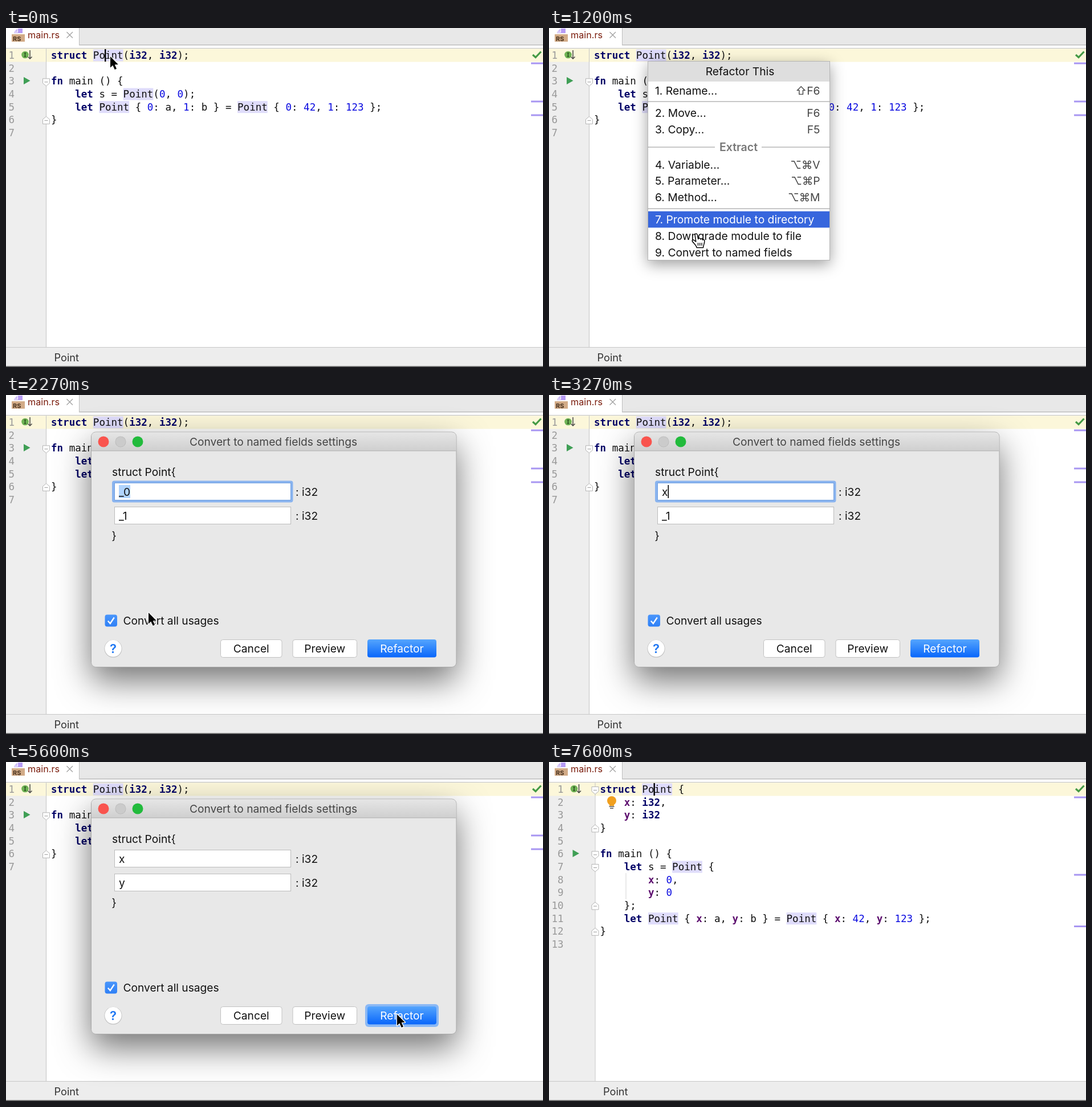
Write an HTML page with a canvas that moves like this. It is 942 by 595 pixels and loops after 7.67 s.

```html
<!DOCTYPE html>
<html lang="en">
<head>
<meta charset="utf-8">
<title>Convert to named fields</title>
<style>
html, body { margin: 0; width: 100%; height: 100%; overflow: hidden; background: #fff; }
canvas { display: block; width: 942px; height: 595px; }
</style>
</head>
<body>
<canvas id="stage"></canvas>
<script>
const W = 942, H = 595, LOOP = 7670;
const canvas = document.getElementById('stage');
const g = canvas.getContext('2d');
const dpr = window.devicePixelRatio || 1;
canvas.width = W * dpr;
canvas.height = H * dpr;

const MONO = '"DejaVu Sans Mono", monospace';
const UI = 'Inter, Roboto, sans-serif';
const CODE_SIZE = 17.52, CHAR = 10.55, ROW = 22.67, ROW_1 = 48;

// Event times in ms
const AT = {
  menuOpen: 330, menuClose: 1730, dialogOpen: 2130, typeX: 2900, tab: 3460,
  typeY: 3860, mouseBack: 4330, press: 5400, dialogClose: 5730, convert: 5860,
  mouseGone: 6800, bulb: 7330
};

const BEFORE = {
  shift: 0, run: 3, open: [1, 3], close: [6], stripes: [62, 129, 153],
  lines: [
    'struct Point(i32, i32);', '', 'fn main () {', '    let s = Point(0, 0);',
    '    let Point { 0: a, 1: b } = Point { 0: 42, 1: 123 };', '}', ''
  ]
};
BEFORE.open = [3];
const AFTER = {
  shift: 10.5, run: 6, open: [1, 6, 7], close: [4, 10, 12], stripes: [62, 198, 288.5],
  lines: [
    'struct Point {', '    x: i32,', '    y: i32', '}', '', 'fn main () {',
    '    let s = Point {', '        x: 0,', '        y: 0', '    };',
    '    let Point { x: a, y: b } = Point { x: 42, y: 123 };', '}', ''
  ]
};

const MENU = [
  [110, '1. Rename...', '⇧F6'], [149, '2. Move...', 'F6'], [177.5, '3. Copy...', 'F5'],
  [239.5, '4. Variable...', '⌥⌘V'], [268, '5. Parameter...', '⌥⌘P'], [297, '6. Method...', '⌥⌘M'],
  [336, '7. Promote module to directory', ''], [365, '8. Downgrade module to file', ''],
  [394, '9. Convert to named fields', '']
];

// Pointer path: time, x, y
const PATH = [
  [0, 183, 50], [600, 183, 50], [867, 212, 150], [1000, 238, 250], [1200, 258, 362],
  [1333, 254, 387], [1467, 250, 382], [4400, 250, 382], [4800, 480, 406], [5200, 686, 443]
];

function rect(x, y, w, h, color) {
  g.fillStyle = color;
  g.fillRect(x, y, w, h);
}

function box(x, y, w, h, r, fill, line) {
  g.beginPath();
  g.roundRect(x, y, w, h, r);
  g.fillStyle = fill;
  g.fill();
  if (line) {
    g.strokeStyle = line;
    g.lineWidth = 1;
    g.stroke();
  }
}

function disc(x, y, r, color) {
  g.beginPath();
  g.arc(x, y, r, 0, Math.PI * 2);
  g.fillStyle = color;
  g.fill();
}

function trace(points, close) {
  g.beginPath();
  points.forEach(([x, y], i) => i ? g.lineTo(x, y) : g.moveTo(x, y));
  if (close) g.closePath();
}

function stroke(points, color, width = 1) {
  trace(points);
  g.strokeStyle = color;
  g.lineWidth = width;
  g.stroke();
}

function fill(points, color) {
  trace(points, true);
  g.fillStyle = color;
  g.fill();
}

function fade(y0, y1, top, bottom) {
  const grad = g.createLinearGradient(0, y0, 0, y1);
  grad.addColorStop(0, top);
  grad.addColorStop(1, bottom);
  return grad;
}

// Text with its capitals centred on y
function label(str, x, y, color = '#111', align = 'left', size = 19.2, weight = 400) {
  g.font = `${weight} ${size}px ${UI}`;
  g.fillStyle = color;
  g.textAlign = align;
  g.fillText(str, x, y + size * 0.364);
}

function code(str, x, y, color, bold) {
  g.font = `${bold ? 'bold ' : ''}${CODE_SIZE}px ${MONO}`;
  g.fillStyle = color;
  g.textAlign = 'left';
  g.fillText(str, x, y + 6);
}

function withShadow(blur, dy, alpha, draw) {
  g.save();
  g.shadowColor = `rgba(0,0,0,${alpha})`;
  g.shadowBlur = blur * dpr;
  g.shadowOffsetY = dy * dpr;
  draw();
  g.restore();
}

const rowY = n => ROW_1 + (n - 1) * ROW;

function codeLine(str, x, y) {
  for (const m of str.matchAll(/\b(struct|fn|let|i32)\b|Point|\d+|[xy](?=:)|[a-z]+|[^\sa-zA-Z\d]+/g)) {
    const tok = m[0], tx = x + m.index * CHAR;
    if (tok === 'Point') rect(tx, y - 10.5, 5 * CHAR, 21, '#dfdcfb');
    if (m[1]) code(tok, tx, y, '#000066', true);
    else if (/^\d/.test(tok)) code(tok, tx, y, '#0a0ae0');
    else if (/^[xy]$/.test(tok)) code(tok, tx, y, '#5c0d6e', true);
    else code(tok, tx, y, '#111');
  }
}

function foldMark(x, y, dir) {
  const pts = [[-6, -6], [6, -6], [6, 2], [0, 7], [-6, 2]].map(([a, b]) => [x + a, y + b * dir]);
  fill(pts, '#fff');
  trace(pts, true);
  g.strokeStyle = '#b4b4b4';
  g.lineWidth = 1;
  g.stroke();
  stroke([[x - 3, y], [x + 3, y]], '#999');
}

function tabBar() {
  rect(0, 0, W, 36, '#fff');
  rect(129, 0, W - 129, 29, '#e8e8e8');
  rect(128, 0, 1, 30, '#bdbdbd');
  rect(128, 29, W - 128, 1.5, '#bdbdbd');
  rect(0, 35, W, 1.5, '#c6c6c6');
  fill([[21, 1], [29, 1], [29, 9], [14, 9], [14, 8], [21, 8]], '#b79cf5');
  fill([[14, 7], [20, 1], [20, 7]], '#cdbcf8');
  rect(10, 11, 23, 13, '#d2ab87');
  label('RS', 12, 18.5, '#4a3420', 'left', 11, 700);
  label('main.rs', 38, 12.5, '#7a1c0c', 'left', 16.2);
  stroke([[106.5, 7], [117, 17.5]], '#a0a0a0', 1.3);
  stroke([[117, 7], [106.5, 17.5]], '#a0a0a0', 1.3);
}

function gutterIcons(doc) {
  const s = doc.shift;
  disc(33.5 + s, 47, 6.3, '#6fb355');
  stroke([[33.5 + s, 43.5], [33.5 + s, 50.5]], '#24491a', 1.5);
  stroke([[31.5 + s, 43.8], [35.5 + s, 43.8]], '#24491a');
  stroke([[31.5 + s, 50.2], [35.5 + s, 50.2]], '#24491a');
  stroke([[42 + s, 39], [42 + s, 54]], '#444', 1.5);
  stroke([[38.5 + s, 50.5], [42 + s, 54], [45.5 + s, 50.5]], '#444', 1.5);
  const y = rowY(doc.run) - 0.8;
  fill([[31 + s, y - 6.5], [42.5 + s, y], [31 + s, y + 6.5]], '#3f9f55');
}

function editor(doc, caret, bulb) {
  const edge = 70 + doc.shift, left = 79 + doc.shift;
  const cols = String(doc.lines.length).length;
  rect(0, 36.5, W, 524, '#fff');
  rect(0, 36.5, edge, 524, '#eeeeee');
  rect(0, 36.5, W, 23, '#fcf7da');
  rect(edge, 36.5, 1, 524, '#c4c4c4');
  doc.lines.forEach((str, i) => {
    const n = String(i + 1);
    code(n, 4.5 + (cols - n.length) * CHAR, rowY(i + 1), '#999');
    codeLine(str, left, rowY(i + 1));
  });
  gutterIcons(doc);
  doc.open.forEach(n => foldMark(edge + 0.5, rowY(n) + 1.5, 1));
  doc.close.forEach(n => foldMark(edge + 0.5, rowY(n) + 1, -1));
  if (doc === AFTER) rect(134.5, 195, 1, 46, '#d4d4d4');
  doc.stripes.forEach(y => rect(921, y - 1.5, 21, 3, '#a896f2'));
  stroke([[924, 47], [929, 51.5], [938.5, 41.5]], '#449a45', 3.2);
  if (caret) rect(173 + doc.shift, 37, 2.4, 22, '#000');
  if (bulb) {
    disc(110, 68, 8, '#f1a01f');
    rect(106, 70, 8, 7, '#f1a01f');
    rect(105.5, 77.5, 9, 1.5, '#555');
    rect(107, 80.5, 6, 1.5, '#555');
  }
  rect(0, 560, W, 35, '#ededed');
  rect(0, 560, W, 1, '#c8c8c8');
  rect(0, 593.5, W, 1.5, '#5a5a5a');
  label('Point', 84.5 + doc.shift, 578, '#333', 'left', 18.2);
}

function menu(selected) {
  withShadow(24, 7, 0.38, () => rect(173, 58, 320, 350, '#fff'));
  rect(173, 58, 320, 350, '#fff');
  rect(173, 58, 320, 36, '#dedede');
  g.strokeStyle = '#b5b5b5';
  g.lineWidth = 1;
  g.strokeRect(173.5, 58.5, 319, 349);
  label('Refactor This', 335, 76, '#111', 'center');
  const lines = [[173, 129, 320], [173, 209, 118], [373, 209, 120], [173, 317, 320]];
  lines.forEach(([x, y, w]) => rect(x, y - 0.5, w, 1.2, '#a3a3a3'));
  label('Extract', 332.5, 209, '#777', 'center', 19.5, 600);
  MENU.forEach(([y, name, keys], i) => {
    const on = i === selected;
    if (on) rect(174, y - 14.3, 318, 28.7, '#3766dd');
    label(name, 186, y, on ? '#fff' : '#111', 'left', 19.3);
    label(keys, 475.5, y, on ? '#fff' : '#444', 'right', 19.3);
  });
}

function field(y, str, focus, selected) {
  if (focus) box(186, y - 19, 317.5, 38, 4, '#8ab4ef');
  rect(190, y - 15.5, 310, 31, focus ? '#6f9fe0' : '#bcbcbc');
  rect(191, y - 14.5, 308, 29, '#fff');
  g.font = `400 19.2px ${UI}`;
  const w = g.measureText(str).width;
  if (selected) rect(198, y - 11.5, w, 23, '#b0d4fd');
  label(str, 198, y + 0.5);
  if (focus && !selected) rect(198 + w, y - 11.5, 1.6, 23, '#000');
  label(': i32', 508, y + 0.5);
}

function button(x, w, str, main, focus) {
  if (focus) box(x - 4, 425, w + 8, 40, 6, '#8ab8f5');
  if (main) box(x, 429, w, 31.5, 4, fade(429, 460, '#55a5fd', '#0a67fb'));
  else box(x + 0.5, 429.5, w - 1, 31, 4, '#fff', '#c2c2c2');
  label(str, x + w / 2, 445, main ? '#fff' : '#111', 'center');
}

function dialog(t) {
  withShadow(58, 24, 0.55, () => box(149, 64.5, 641, 413, 8, '#e8e8e8'));
  box(149.5, 65, 640.5, 412.5, 8, '#e8e8e8', '#a9a9a9');
  box(150, 65.5, 639.5, 32.5, [7, 7, 0, 0], fade(65, 98, '#e6e6e6', '#cfcfcf'));
  rect(150, 97.5, 639.5, 1, '#b0b0b0');
  disc(171, 82, 9.5, '#f9544e');
  disc(201, 82, 9.5, '#b9b9b9');
  disc(201, 82, 8.7, '#cbcbcb');
  disc(231, 82, 9.5, '#22bb3c');
  label('Convert to named fields settings', 469, 82.5, '#444', 'center');

  label('struct Point{', 186, 135.5);
  const second = t >= AT.tab, pressed = t >= AT.press;
  field(169.5, t < AT.typeX ? '_0' : 'x', !second, t < AT.typeX);
  field(211.5, t < AT.typeY ? '_1' : 'y', second && !pressed, second && t < AT.typeY);
  label('}', 185.5, 247.5);

  box(173.5, 385.5, 21.5, 21, 4, fade(385, 407, '#4a96fb', '#2f80f6'));
  stroke([[178.8, 396.5], [182.8, 401], [189.8, 390.5]], '#fff', 2.3);
  label('Convert all usages', 205.5, 396.5);
  disc(188, 445.3, 15.5, '#bebebe');
  disc(188, 444.8, 14.7, '#fff');
  label('?', 188, 445, '#1d76f3', 'center', 22, 600);
  button(376, 108.5, 'Cancel');
  button(502.5, 113.5, 'Preview');
  button(634, 121, 'Refactor', true, pressed);
}

function pointerAt(t) {
  let i = 1;
  while (i < PATH.length - 1 && t > PATH[i][0]) i++;
  const [t0, x0, y0] = PATH[i - 1], [t1, x1, y1] = PATH[i];
  const p = Math.min(1, Math.max(0, (t - t0) / (t1 - t0)));
  return [x0 + (x1 - x0) * p, y0 + (y1 - y0) * p];
}

function arrow(x, y) {
  const pts = [[0, 0], [0, 19.5], [4.3, 15.5], [7.8, 23], [11, 21.6], [7.7, 14.2], [13.8, 14]];
  trace(pts.map(([a, b]) => [x + a, y + b]), true);
  g.lineJoin = 'round';
  g.strokeStyle = '#fff';
  g.lineWidth = 2.6;
  g.stroke();
  g.fillStyle = '#000';
  g.fill();
}

function hand(x, y) {
  g.save();
  g.translate(x, y);
  g.beginPath();
  g.moveTo(-2, 1);
  g.bezierCurveTo(-1.5, -2, 2, -1.5, 2.3, 1.5);
  g.lineTo(3.8, 8.5);
  g.bezierCurveTo(4.5, 6, 7.5, 6.5, 7.8, 9);
  g.bezierCurveTo(8.8, 7, 11.3, 7.8, 11.5, 10);
  g.bezierCurveTo(12.8, 8.5, 15, 9.5, 14.8, 12);
  g.bezierCurveTo(15, 16, 13, 18, 12.5, 23.5);
  g.lineTo(1.2, 23.5);
  g.bezierCurveTo(0, 19, -4, 16, -6.5, 12.5);
  g.bezierCurveTo(-7.8, 10, -4.5, 9, -3, 11);
  g.lineTo(-0.3, 13);
  g.closePath();
  g.fillStyle = '#fff';
  g.fill();
  g.strokeStyle = '#000';
  g.lineWidth = 1.5;
  g.lineJoin = 'round';
  g.stroke();
  [3.5, 6.7, 10].forEach(a => stroke([[a, 15], [a, 20]], '#000', 1.3));
  g.restore();
}

function beam(x, y) {
  for (const [color, width] of [['#fff', 3.5], ['#111', 1.7]]) {
    g.strokeStyle = color;
    g.lineWidth = width;
    g.beginPath();
    for (const d of [-1, 1]) {
      g.moveTo(x - 5, y + 11.5 * d);
      g.quadraticCurveTo(x, y + 11.5 * d, x, y + 8 * d);
      g.quadraticCurveTo(x, y + 11.5 * d, x + 5, y + 11.5 * d);
    }
    g.moveTo(x, y - 9);
    g.lineTo(x, y + 9);
    g.moveTo(x - 3, y + 3.5);
    g.lineTo(x + 3, y + 3.5);
    g.stroke();
  }
}

function pointer(t, menuOn) {
  if ((t >= AT.typeX && t < AT.mouseBack) || t >= AT.mouseGone) return;
  const [x, y] = pointerAt(t);
  if (t >= AT.convert) beam(x + 1, y);
  else if (menuOn && y > 95) hand(x, y);
  else arrow(x, y);
}

function caretOn(t) {
  if (t < AT.convert) return t < AT.menuOpen;
  return t < 6140 || (t - 6140) % 1000 < 500;
}

function draw(now) {
  const step = Math.min(114, Math.floor((now % LOOP + 5) * 0.015));
  const t = step / 0.015;
  const menuOn = t >= AT.menuOpen && t < AT.menuClose;
  g.setTransform(dpr, 0, 0, dpr, 0, 0);
  g.lineJoin = 'miter';
  tabBar();
  editor(t < AT.convert ? BEFORE : AFTER, caretOn(t), t >= AT.bulb);
  if (menuOn) {
    // Selection trails the pointer by one step
    const y = pointerAt(t - 66.67)[1];
    menu(Math.max(0, MENU.findLastIndex(item => item[0] - 14.3 <= y)));
  }
  if (t >= AT.dialogOpen && t < AT.dialogClose) dialog(t);
  pointer(t, menuOn);
}

function loop() {
  draw(performance.now());
  requestAnimationFrame(loop);
}
loop();
</script>
</body>
</html>
```
